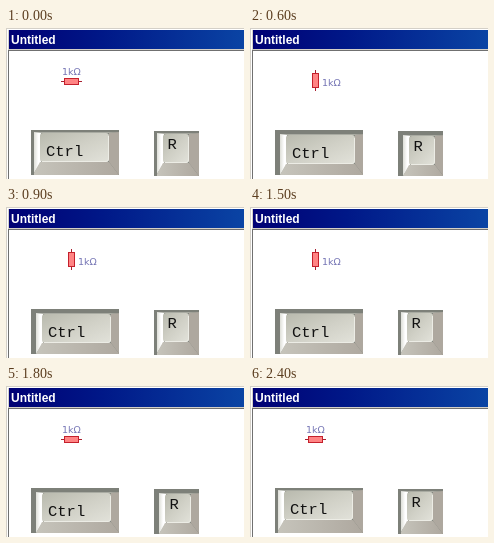
Recreate the animation shown at these times as an HTML page. Size 238 by 151 pixels, loop 3.4 s.

```html
<!DOCTYPE html>
<html lang="en">
<head>
<meta charset="utf-8">
<title>Rotate shortcut</title>
<style>
  html, body { margin: 0; width: 100%; height: 100%; overflow: hidden; background: #fff; }
  body > svg { display: block; width: 238px; height: 151px; }
  .title { font: bold 12px "Liberation Sans", Arial, sans-serif; fill: #fff; }
  .value { font: 9.5px "DejaVu Sans", Verdana, sans-serif; fill: #7474b4; }
  .cap { font: 15.5px "Liberation Mono", "Courier New", monospace; fill: #111; }
  .crisp { shape-rendering: crispEdges; }
</style>
</head>
<body>
<svg viewBox="0 0 238 151">
  <defs>
    <linearGradient id="bar">
      <stop offset="0" stop-color="#000074"/>
      <stop offset=".4" stop-color="#001888"/>
      <stop offset="1" stop-color="#0a44a4"/>
    </linearGradient>
    <linearGradient id="face" x2="1" y2="1">
      <stop offset="0" stop-color="#b9baae"/>
      <stop offset=".5" stop-color="#d0d0c6"/>
      <stop offset="1" stop-color="#e2e2da"/>
    </linearGradient>
    <linearGradient id="side">
      <stop offset="0" stop-color="#dedfd8"/>
      <stop offset=".6" stop-color="#fff"/>
    </linearGradient>
    <linearGradient id="front">
      <stop offset="0" stop-color="#c6c4bb"/>
      <stop offset="1" stop-color="#aea89f"/>
    </linearGradient>
  </defs>

  <g class="crisp">
    <path fill="#d4d0c8" d="M0 0H238V2H0zM0 0H2V151H0z"/>
    <path fill="#fff" d="M1 1H238V2H1zM1 1H2V151H1z"/>
    <rect x="3" y="2" width="235" height="19" fill="url(#bar)"/>
    <path fill="#d4d0c8" d="M2 2H3V21H2zM2 21H238V22H2z"/>
    <path fill="#707070" d="M2 22H238V23H2zM2 22H3V151H2z"/>
  </g>
  <text class="title" x="5" y="16">Untitled</text>

  <g id="part">
    <path stroke="#a82030" d="M55 53.5H76"/>
    <rect x="58.5" y="50.5" width="14" height="6" fill="#ff8484" stroke="#c4202c"/>
  </g>
  <text id="value" class="value">1kΩ</text>

  <g id="keys"></g>
</svg>
<script>
const $ = id => document.getElementById(id);
const LOOP = 3400, TRAVEL = 2;

// start time, Ctrl down, R down, resistor upright
const STEPS = [
  [0, 0, 0, 0],
  [300, 1, 0, 0],
  [600, 1, 1, 1],
  [900, 1, 0, 1],
  [1200, 0, 0, 1],
  [1500, 1, 0, 1],
  [1800, 1, 1, 0],
  [2100, 1, 0, 0],
  [2400, 0, 0, 0]
];

const poly = (fill, ...pts) => `<polygon points="${pts.join(' ')}" fill="${fill}"/>`;

// A key slides inside its dark socket, which also clips it.
function keyMarkup(id, x, y, w, label, tx, ty) {
  const h = 45, l = 9, t = 3, r = w - 10, b = h - 13;
  return `<svg x="${x}" y="${y}" width="${w}" height="${h}">` +
    `<rect width="${w}" height="${h}" fill="#7d8079"/><g id="${id}">` +
    poly('#a9aba2', [3, 2], [w, 2], [r, t], [l, t]) +
    poly('url(#side)', [3, 2], [l + 1, t], [l + 1, b], [3, h - 2]) +
    poly('#aea89f', [w, 2], [w, h], [r, b], [r, t]) +
    poly('url(#front)', [3, h - 2], [l, b], [r, b], [w, h], [3, h]) +
    `<rect x="${l}" y="${t}" width="${r - l}" height="${b - t}" rx="3" fill="url(#face)"/>` +
    `<path d="M${l + 2} ${b - .5}H${r - 3}Q${r - .5} ${b - .5} ${r - .5} ${b - 3}V${t + 3}" fill="none" stroke="#ecece5"/>` +
    `<text class="cap" x="${tx}" y="${ty}">${label}</text></g></svg>`;
}

$('keys').innerHTML =
  keyMarkup('ctrl', 25, 102, 88, 'Ctrl', 15, 26) +
  keyMarkup('r', 148, 103, 45, 'R', 13.5, 18);

function press(id, down) {
  const d = down * TRAVEL;
  $(id).setAttribute('transform', `translate(${d} ${d})`);
}

function show([, ctrl, r, upright]) {
  press('ctrl', ctrl);
  press('r', r);
  $('part').setAttribute('transform', upright ? 'translate(0 -1) rotate(90 65.5 53.5)' : '');
  $('value').setAttribute('x', upright ? 72 : 56);
  $('value').setAttribute('y', upright ? 58 : 47);
}

let shown;
const start = performance.now();
function tick() {
  const t = (performance.now() - start) % LOOP;
  const step = STEPS.filter(s => s[0] <= t).pop();
  if (step !== shown) show(shown = step);
  requestAnimationFrame(tick);
}
tick();
</script>
</body>
</html>
```
